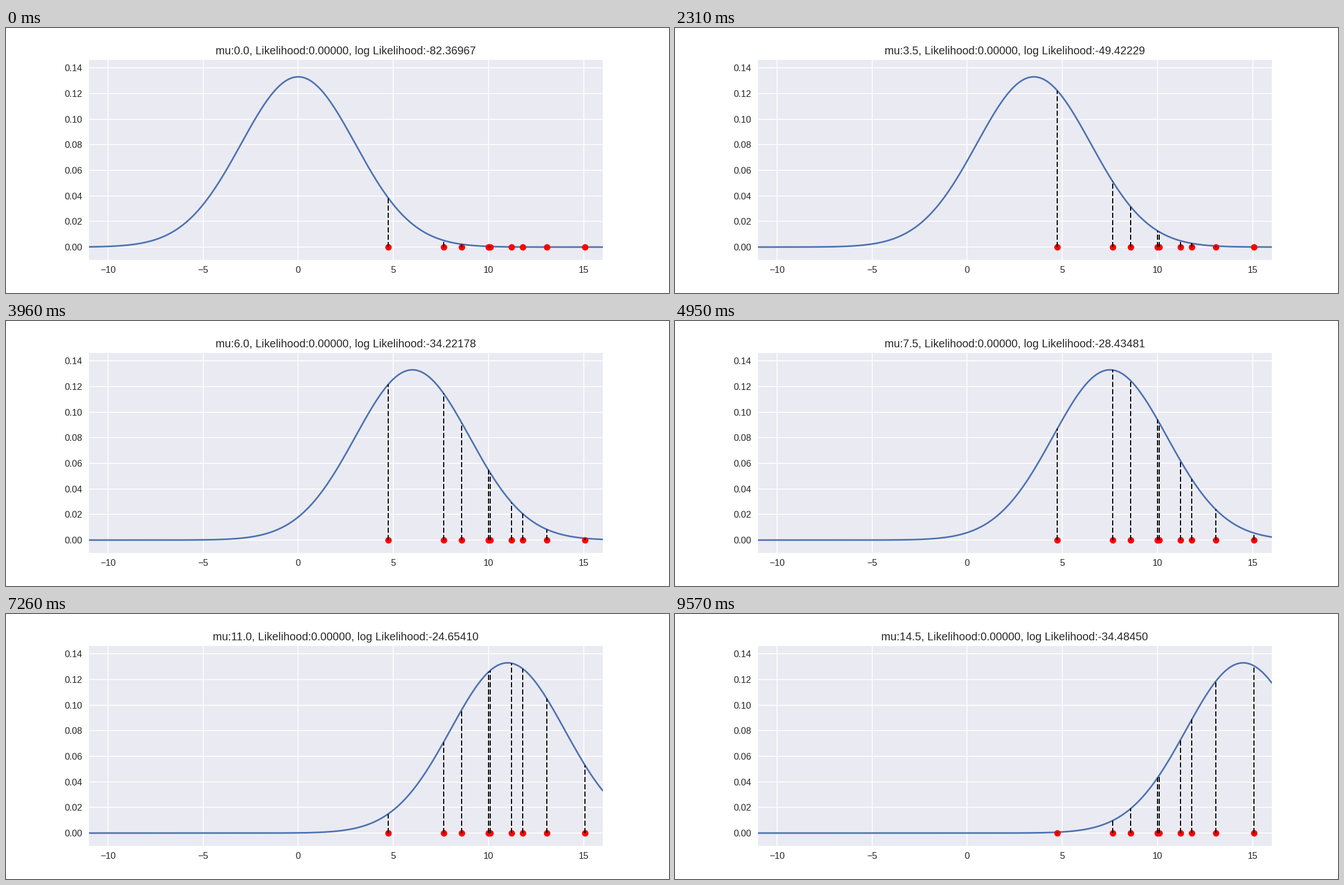
Write a matplotlib script that moves like this. It is 1183x473 px and loops after 9900 ms.

```python
import numpy as np
import matplotlib.pyplot as plt
from matplotlib.animation import FuncAnimation

WIDTH, HEIGHT, DPI = 1183, 473, 118.3
FRAMES, INTERVAL = 30, 330
SIGMA, MU_STEP = 3, 0.5
INK = "0.15"

plt.rcParams["font.family"] = "Liberation Sans"


def normal_pdf(x, mu):
    z = (x - mu) / SIGMA
    return np.exp(-z * z / 2) / (SIGMA * np.sqrt(2 * np.pi))


def stems(mu):
    return [[(x, 0), (x, y)] for x, y in zip(samples, normal_pdf(samples, mu))]


samples = np.random.RandomState(7).normal(10, SIGMA, 10)
xs = np.linspace(-11, 16, 500)

fig = plt.figure(figsize=(WIDTH / DPI, HEIGHT / DPI), dpi=DPI, facecolor="white")
fig.subplots_adjust(left=0.125, right=0.9, bottom=0.125, top=0.88)
ax = fig.add_subplot(facecolor="#EAEAF2")
ax.set_axisbelow(True)
ax.grid(color="white", linewidth=1, linestyle="-")
ax.spines[:].set_visible(False)
ax.tick_params(length=0, pad=7, labelsize=10, labelcolor=INK)
ax.set_xticks(range(-10, 16, 5))
ax.set_yticks(np.arange(8) * 0.02)
ax.yaxis.set_major_formatter("{x:.2f}")
ax.set_xlim(-11, 16)
ax.set_ylim(-0.01, 1.1 * normal_pdf(0, 0))

curve, = ax.plot(xs, normal_pdf(xs, 0), color="#4C72B0", linewidth=1.75,
                 solid_capstyle="round", zorder=2)
ax.plot(samples, np.zeros_like(samples), "o", color="red", markersize=7,
        markeredgewidth=0, zorder=3)
drops = ax.vlines(samples, 0, normal_pdf(samples, 0), colors="black",
                  linewidths=1.2, linestyles=[(0, (4.6, 2.0))], zorder=4)
title = ax.set_title("", fontsize=12, color=INK, pad=6)


def update(frame):
    mu = frame * MU_STEP
    density = normal_pdf(samples, mu)
    curve.set_ydata(normal_pdf(xs, mu))
    drops.set_segments(stems(mu))
    title.set_text(f"mu:{mu:.1f}, Likelihood:{density.prod():.5f}, "
                   f"log Likelihood:{np.log(density).sum():.5f}")
    return curve, drops, title


anim = FuncAnimation(fig, update, frames=FRAMES, interval=INTERVAL,
                     init_func=lambda: update(0), repeat=True, repeat_delay=0)
plt.show()
```
